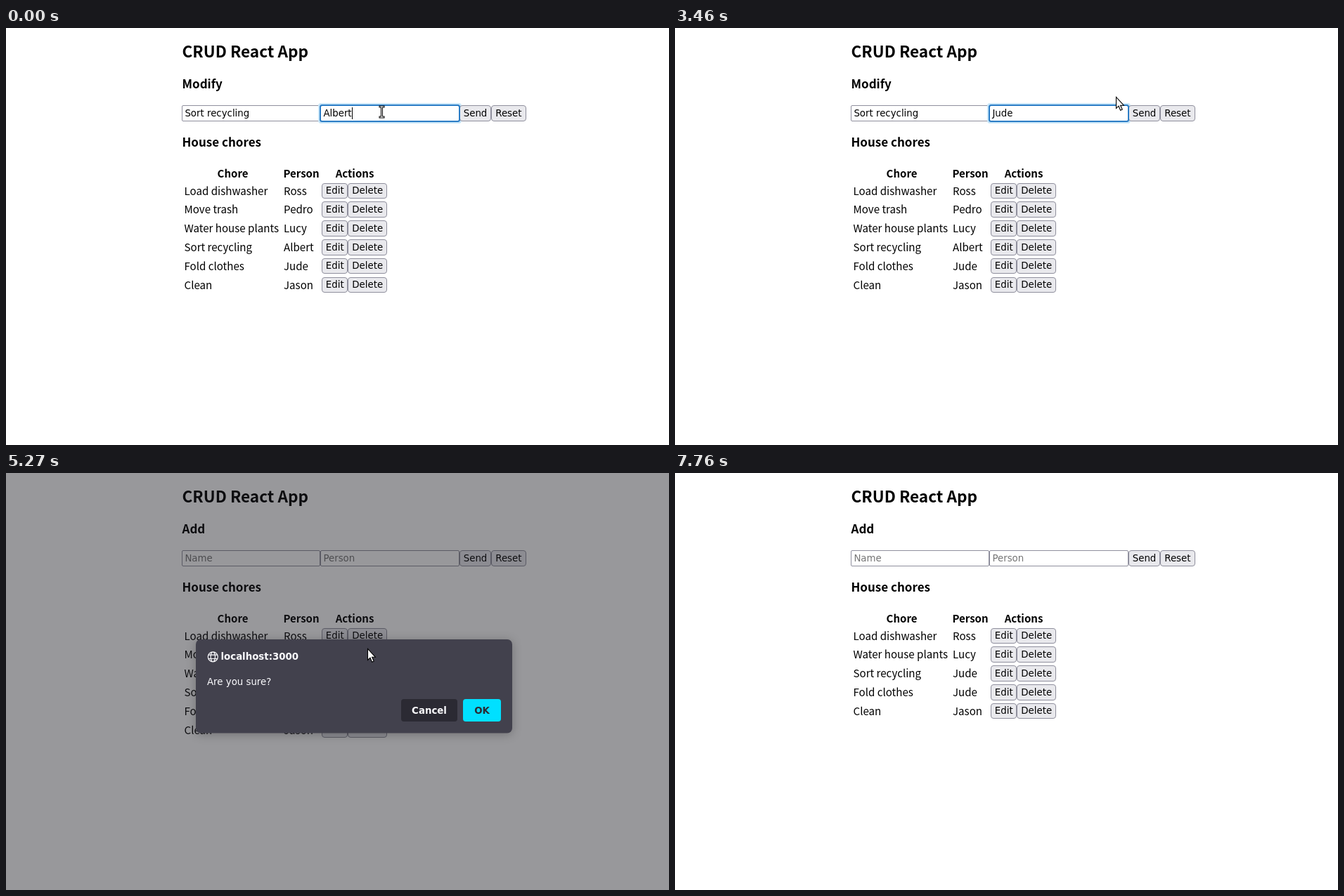
Animation of 943x594 px, one loop 8420 ms. Source, as an HTML page with a canvas:

```html
<!DOCTYPE html>
<html lang="en">
<head>
<meta charset="utf-8">
<title>CRUD React App</title>
<style>
html, body { margin: 0; width: 100%; height: 100%; overflow: hidden; background: #fff; }
canvas { display: block; }
</style>
</head>
<body>
<canvas id="stage" width="943" height="594"></canvas>
<script>
const ctx = document.getElementById('stage').getContext('2d');
const LOOP = 8420;
const PAGE = '"Noto Sans CJK JP", "Noto Sans CJK SC", "Noto Sans", sans-serif';
const UI = '13.333px "DejaVu Sans", sans-serif';
const UI_BOLD = 'bold ' + UI;
const BODY = '15.1px ' + PAGE;
const HEAD = 'bold 15px ' + PAGE;
const H3 = 'bold 17px ' + PAGE;
const H2 = 'bold 22.6px ' + PAGE;

const OLD_NAME = 'Albert', NEW_NAME = 'Jude';
const ERASE = [570, 720, 800, 1040, 1120, 1520];
const TYPE = [2010, 2170, 2420, 2570];
const CARET_OFF = 3150, PRESS = 4090, SAVED = 4170;
const ASK = 5270, CONFIRM = 6480, GONE = 7760;

const chores = [
  ['Load dishwasher', 'Ross'],
  ['Move trash', 'Pedro'],
  ['Water house plants', 'Lucy'],
  ['Sort recycling', OLD_NAME],
  ['Fold clothes', NEW_NAME],
  ['Clean', 'Jason']
];

// Pointer moves: start time, step length, step count, path
const moves = [
  [0, 80, 1, [[534.5, 119.5]]],
  [80, 80, 1, [[534.5, 122]]],
  [3150, 77.5, 10, [[534, 121], [580, 104], [627, 98], [686, 150], [667, 122]]],
  [4260, 80, 1, [[670, 132]]],
  [4400, 77.5, 10, [[670, 132], [600, 202], [514, 250]]],
  [5510, 76, 4, [[514, 250], [667, 312]]],
  [6070, 80, 1, [[673, 325]]],
  [6480, 80, 1, [[683, 342]]],
  [7380, 76, 5, [[683, 342], [401, 11]]]
];

function pointerAt(t) {
  const [start, step, count, path] = moves.findLast(m => t >= m[0]);
  const done = Math.min(count, Math.floor((t - start) / step + 1e-6) + 1) / count;
  const pos = done * (path.length - 1);
  const i = Math.min(Math.floor(pos), Math.max(0, path.length - 2));
  const a = path[i], b = path[i + 1] || a, f = pos - i;
  return { x: a[0] + (b[0] - a[0]) * f, y: a[1] + (b[1] - a[1]) * f };
}

const passed = (times, t) => times.filter(v => t >= v).length;

function personText(t) {
  const typed = passed(TYPE, t);
  return typed ? NEW_NAME.slice(0, typed)
    : OLD_NAME.slice(0, OLD_NAME.length - passed(ERASE, t));
}

function text(str, x, y, font, color = '#000', align = 'left') {
  ctx.font = font;
  ctx.textAlign = align;
  ctx.fillStyle = color;
  ctx.fillText(str, x, y);
}

function box(x, y, w, h, r, fill, stroke, line = 1) {
  const o = stroke ? line / 2 : 0;
  ctx.beginPath();
  ctx.roundRect(x + o, y + o, w - 2 * o, h - 2 * o, r);
  if (fill) { ctx.fillStyle = fill; ctx.fill(); }
  if (stroke) { ctx.strokeStyle = stroke; ctx.lineWidth = line; ctx.stroke(); }
}

// Layout is fractional; edges snap to whole pixels
function button(label, x, y, w, mouse, pressed) {
  const left = Math.round(x), right = Math.round(x + w);
  const top = Math.round(y), bottom = Math.round(y + 22.6);
  const over = mouse && mouse.x >= left && mouse.x < right && mouse.y >= top && mouse.y < bottom;
  const fill = !over ? '#e9e9ed' : pressed ? '#b1b1b9' : '#d0d0d7';
  box(left, top, right - left, bottom - top, 3.5, fill, over ? '#676774' : '#8f8f9d');
  text(label, x + w / 2, Math.round(y + 15.6), UI, '#000', 'center');
}

function input(x, w, value, hint) {
  box(x, 110, w, 23, 1.5, '#fff', '#8f8f9d');
  text(value || hint, x + 4.4, 126, UI, value ? '#000' : '#757575');
}

function drawForm(t, mouse) {
  const editing = t < SAVED, focused = t < PRESS;
  const person = editing ? personText(t) : '';
  text(editing ? 'Modify' : 'Add', 250.5, 86, H3);
  input(250, 197, editing ? 'Sort recycling' : '', 'Name');
  if (focused) box(444, 107, 204, 29, 4, '#c8e6f8');
  input(447, 198, person, 'Person');
  button('Send', 645.1, 110.4, 44.9, mouse, t < SAVED);
  button('Reset', 690, 110.4, 49.7, mouse);
  if (focused) box(446, 109, 200, 25, 2.5, null, '#2b7dc6', 2);
  if (t < CARET_OFF) {
    ctx.font = UI;
    ctx.fillStyle = '#000';
    ctx.fillRect(Math.floor(451.9 + ctx.measureText(person).width), 113, 1, 17);
  }
}

function drawTable(t, mouse) {
  text('House chores', 250.5, 169, H3);
  text('Chore', 322.5, 213, HEAD, '#000', 'center');
  text('Person', 420, 213, HEAD, '#000', 'center');
  text('Actions', 496, 213, HEAD, '#000', 'center');
  const rows = chores.filter((row, i) => i !== 1 || t < CONFIRM);
  rows.forEach(([chore, person], i) => {
    const y = 220.6 + 26.8 * i;
    const base = Math.round(y + 17);
    const who = chore === 'Sort recycling' && t >= SAVED ? NEW_NAME : person;
    text(chore, 253.5, base, BODY);
    text(who, 395, base, BODY);
    button('Edit', 449, y, 37.4, mouse);
    button('Delete', 486.4, y, 55.6, mouse);
  });
}

function drawGlobe(x, y) {
  ctx.strokeStyle = '#fbfbfe';
  ctx.lineWidth = 1.2;
  ctx.beginPath();
  ctx.arc(x, y, 7, 0, 7);
  ctx.moveTo(x + 3.2, y);
  ctx.ellipse(x, y, 3.2, 7, 0, 0, 7);
  ctx.moveTo(x - 6.2, y - 2.7);
  ctx.lineTo(x + 6.2, y - 2.7);
  ctx.moveTo(x - 6.2, y + 2.7);
  ctx.lineTo(x + 6.2, y + 2.7);
  ctx.stroke();
}

function drawDialog() {
  ctx.fillStyle = 'rgba(28, 27, 34, 0.45)';
  ctx.fillRect(0, 0, 943, 594);
  ctx.save();
  ctx.shadowColor = 'rgba(0, 0, 0, 0.25)';
  ctx.shadowBlur = 14;
  ctx.shadowOffsetY = 2;
  box(270, 237, 450, 133.5, 7, '#42414d');
  ctx.restore();
  drawGlobe(294.3, 261.8);
  text('localhost:3000', 305.5, 266, UI_BOLD, '#fbfbfe');
  text('Are you sure?', 286, 302, UI, '#fbfbfe');
  box(562, 322, 80, 32, 4, '#2b2a33');
  text('Cancel', 602, 343, UI_BOLD, '#fbfbfe', 'center');
  box(650, 322, 54, 32, 4, '#00e0ff');
  text('OK', 677, 343, UI_BOLD, '#2b2a33', 'center');
}

function outline(color, width) {
  ctx.strokeStyle = color;
  ctx.lineWidth = width;
  ctx.stroke();
}

function drawArrow() {
  const points = [[0.5, 0.5], [0.5, 16.5], [4, 13.2], [6.6, 19.2], [9.2, 18], [6.6, 12.2], [11.3, 12.2]];
  ctx.beginPath();
  points.forEach(([x, y]) => ctx.lineTo(x, y));
  ctx.closePath();
  ctx.fillStyle = '#fff';
  ctx.fill();
  outline('#000', 1.1);
}

function drawBeam() {
  ctx.lineCap = 'square';
  ctx.beginPath();
  for (const y of [-7.5, 7.5]) {
    ctx.moveTo(-2.5, y);
    ctx.lineTo(2.5, y);
  }
  ctx.moveTo(0, -7.5);
  ctx.lineTo(0, 7.5);
  outline('#000', 3);
  outline('#fff', 1);
}

function drawPointer({ x, y }, modal) {
  const overInput = !modal && x >= 250 && x < 645 && y >= 110 && y < 133;
  ctx.save();
  ctx.translate(x, y);
  if (overInput) drawBeam(); else drawArrow();
  ctx.restore();
}

function draw(t) {
  const mouse = t < GONE ? pointerAt(t) : null;
  const modal = t >= ASK && t < CONFIRM;
  const target = modal ? null : mouse;
  ctx.fillStyle = '#fff';
  ctx.fillRect(0, 0, 943, 594);
  text('CRUD React App', 250.5, 42, H2);
  drawForm(t, target);
  drawTable(t, target);
  if (modal) drawDialog();
  if (mouse) drawPointer(mouse, modal);
}

const began = performance.now();
function tick() {
  draw((performance.now() - began) % LOOP);
  requestAnimationFrame(tick);
}
tick();
</script>
</body>
</html>
```
